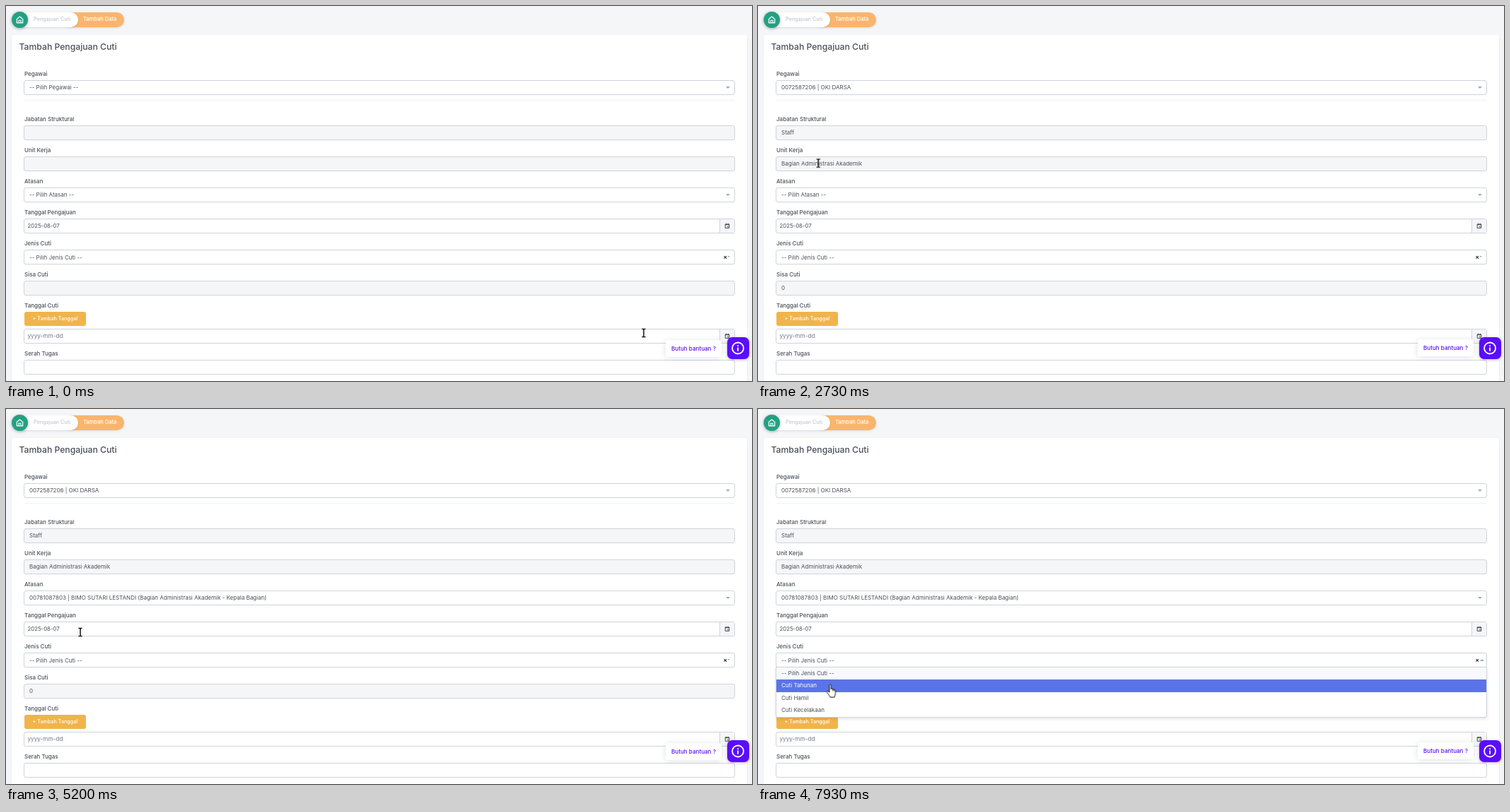
Write an HTML page that moves like this. It is 1054x531 px and loops after 8000 ms.

```html
<!DOCTYPE html>
<html lang="id">
<head>
<meta charset="utf-8">
<title>Tambah Pengajuan Cuti</title>
<style>
  html, body { margin: 0; width: 100%; height: 100%; overflow: hidden; background: #f5f6f8; }
  #stage { position: absolute; left: 0; top: 0; width: 1054px; height: 531px; overflow: hidden;
    font: 400 8px/20px Inter, "Open Sans", sans-serif; color: #495057; white-space: nowrap; }
  #stage div, #stage span, #stage svg { position: absolute; box-sizing: border-box; }
  svg { overflow: visible; }

  .card { left: 8px; top: 41px; width: 1039px; height: 500px; background: #fff; border-radius: 3px; box-shadow: 0 1px 3px rgba(15,34,58,.06); }
  .pill { top: 9px; height: 20.5px; line-height: 20px; border-radius: 11px; font-size: 7.2px; font-weight: 500; box-shadow: 0 1px 3px rgba(15,34,58,.12); }
  .home { left: 8px; top: 8px; width: 23px; height: 23px; border-radius: 50%; background: #23a183; box-shadow: 0 1px 4px rgba(15,34,58,.35); }
  h1 { position: absolute; left: 18.5px; top: 48px; margin: 0; font: 500 12.2px/20px Inter, "Open Sans", sans-serif; }
  .label { left: 26px; font-weight: 500; }
  .field { left: 25px; width: 1005px; height: 21px; line-height: 19px; background: #fff; border: 1px solid #ced4da; border-radius: 3px; }
  .field span { left: 7px; }
  .off { background: #f5f6f8; }
  .date span { left: 4.5px; }
  .cal { right: 0; top: 0; width: 21px; height: 19px; background: #f5f6f8; border-left: 1px solid #ced4da; }
  .caret { right: 6px; top: 8px; border: 3px solid transparent; border-top: 3.5px solid #a4a9af; border-bottom: 0; }
  .up { right: 4px; top: -15px; width: 10px; height: 9px; background: #fff; }
  .up::after { content: ""; position: absolute; left: 2px; top: 3px; border: 3px solid transparent; border-bottom: 3.5px solid #a4a9af; border-top: 0; }
  .field .clear { left: 987.5px; font-size: 8px; font-weight: 800; color: #343a40; }
  .small { right: 6px; border-width: 2.4px 2.4px 0; }
  .button { left: 25.6px; top: 433px; width: 87.6px; height: 19.6px; border-radius: 3px; background: #f1b44c; color: #fff;
    font-size: 7.2px; font-weight: 500; text-align: center; }

  .list { left: 25px; width: 1005px; background: #fff; border: 1px solid #ced4da; border-radius: 0 0 3px 3px; box-shadow: 0 2px 4px rgba(15,34,58,.12); }
  .search { left: 6px; top: 5px; width: 992px; height: 17px; border: 1px solid #c6cace; }
  .search::after { content: ""; position: absolute; left: 2px; top: 2.5px; width: 1px; height: 10px; background: #6c7278; }
  .row { left: 0; width: 1003px; height: 18px; line-height: 17.5px; padding-left: 7px; }
  .picked { background: #f8f9fa; }

  .picker { left: 25px; top: 143px; width: 133px; height: 153px; padding: 6px; background: #fff; border: 1px solid #e3e6ea;
    border-radius: 3px; box-shadow: 0 2px 8px rgba(15,34,58,.12); font-size: 7.5px; }
  .picker span { width: 17px; height: 17px; line-height: 17px; text-align: center; border-radius: 2px; }
  .picker .head { font-weight: 500; }
  .picker .pale { color: #adb5bd; }
  .picker .now { background: #5b73e8; color: #fff; }

  .help { left: 932px; top: 471.7px; width: 79px; height: 24.5px; line-height: 24px; padding-left: 8px; background: #fff; border-radius: 3px;
    box-shadow: 0 1px 9px rgba(15,34,58,.13); color: #5a10f2; font-size: 8.1px; font-weight: 500; }
  .info { left: 1019px; top: 469px; width: 31px; height: 31px; border-radius: 7px; background: #5b0dfb; box-shadow: 0 1px 4px rgba(40,10,110,.3); }

  /* One shared 8 s timeline; 1% is 80 ms */
  .t { animation: 8s step-end infinite; }
  @keyframes list1 { 0%, 20% { visibility: hidden } 10% { visibility: visible } }
  @keyframes list2 { 0%, 57.5% { visibility: hidden } 42.6% { visibility: visible } }
  @keyframes list3 { 0% { visibility: hidden } 92.5%, 100% { visibility: visible } }
  @keyframes picker { 0%, 83.4% { visibility: hidden } 68.4% { visibility: visible } }
  @keyframes name-before { 0% { visibility: visible } 20%, 100% { visibility: hidden } }
  @keyframes name-after { 0% { visibility: hidden } 20%, 100% { visibility: visible } }
  @keyframes chief-before { 0% { visibility: visible } 57.5%, 100% { visibility: hidden } }
  @keyframes chief-after { 0% { visibility: hidden } 57.5%, 100% { visibility: visible } }
  @keyframes post { 0% { visibility: hidden } 22.9%, 100% { visibility: visible } }
  @keyframes left { 0% { visibility: hidden } 25.9%, 100% { visibility: visible } }
  @keyframes cool1 { 0% { background: #5b73e8; color: #fff } 17.5%, 100% { background: #f8f9fa; color: #495057 } }
  @keyframes warm1 { 0% { background: #fff; color: #495057 } 17.5%, 100% { background: #5b73e8; color: #fff } }
  @keyframes warm2 { 0% { background: #fff; color: #495057 } 49.5%, 100% { background: #5b73e8; color: #fff } }
  @keyframes cool3 { 0% { background: #5b73e8; color: #fff } 98.4%, 100% { background: #f8f9fa; color: #495057 } }
  @keyframes warm3 { 0% { background: #fff; color: #495057 } 98.4%, 100% { background: #5b73e8; color: #fff } }

  @keyframes beam { 0%, 20.8%, 58.3% { visibility: visible } 2.5%, 36%, 80%, 100% { visibility: hidden } }
  @keyframes hand { 0%, 20.8%, 58.3% { visibility: hidden } 8%, 39%, 88%, 100% { visibility: visible } }
  @keyframes arrow { 0%, 8%, 39%, 88%, 100% { visibility: hidden } 2.5%, 36%, 80% { visibility: visible } }
  #cursor { left: 0; top: 0; animation: move 8s linear infinite; }
  @keyframes move {
    0%, .8% { transform: translate(901px, 463px) }
    2.5% { transform: translate(850px, 432px) }
    7.5% { transform: translate(170px, 140px) }
    9.1% { transform: translate(116px, 116px) }
    11.6% { transform: translate(114px, 117px) }
    15.8% { transform: translate(118.5px, 169px) }
    19.1% { transform: translate(112px, 178px) }
    20.8% { transform: translate(108px, 176px) }
    23.3% { transform: translate(102.5px, 173px) }
    27.5% { transform: translate(100px, 178px) }
    32.5% { transform: translate(88px, 212px) }
    38.4% { transform: translate(78px, 250px) }
    41.6%, 43.6% { transform: translate(76px, 267px) }
    47.5% { transform: translate(84px, 312px) }
    51.6%, 57.5% { transform: translate(96px, 329px) }
    62.5% { transform: translate(104px, 317px) }
    65%, 75% { transform: translate(105px, 316px) }
    77.5% { transform: translate(104px, 312px) }
    83.4%, 85.2% { transform: translate(93.3px, 297px) }
    86.6% { transform: translate(92px, 338px) }
    89.1% { transform: translate(91px, 353px) }
    94.1% { transform: translate(92px, 355px) }
    97.5% { transform: translate(97px, 372px) }
    99.1%, 100% { transform: translate(101.5px, 389px) }
  }
</style>
</head>
<body>
<div id="stage">
  <div class="pill" style="left:80px;width:86.5px;padding-left:29px;background:#fab56c;color:#fff;font-size:7.5px">Tambah Data</div>
  <div class="pill" style="left:12px;width:89.5px;padding-left:27px;background:#fff;color:#c2c5ca">Pengajuan Cuti</div>
  <div class="home"><svg width="23" height="23" fill="none" stroke="#fff" stroke-width="1.2" stroke-linejoin="round"><path d="M7.3 10.5 11.5 7l4.2 3.5v5.3H7.3zM10 15.6v-3.2h3v3.2"/></svg></div>

  <div class="card"></div>
  <h1>Tambah Pengajuan Cuti</h1>

  <div class="label" style="top:86px">Pegawai</div>
  <div class="field" style="top:105px">
    <span class="t" style="animation-name:name-before">-- Pilih Pegawai --</span>
    <span class="t" style="animation-name:name-after">0072587206 | OKI DARSA</span>
    <div class="caret"></div>
  </div>
  <div style="left:26px;top:133px;width:1003px;height:1px;background:#f0f1f3"></div>

  <div class="label" style="top:150px">Jabatan Struktural</div>
  <div class="field off" style="top:169px"><span class="t" style="animation-name:post">Staff</span></div>

  <div class="label" style="top:193.5px">Unit Kerja</div>
  <div class="field off" style="top:213px"><span class="t" style="animation-name:post">Bagian Administrasi Akademik</span></div>

  <div class="label" style="top:238px">Atasan</div>
  <div class="field" style="top:257px">
    <span class="t" style="animation-name:chief-before">-- Pilih Atasan --</span>
    <span class="t" style="animation-name:chief-after">00781087803 | BIMO SUTARI LESTANDI (Bagian Administrasi Akademik - Kepala Bagian)</span>
    <div class="caret"></div>
  </div>

  <div class="label" style="top:281.5px">Tanggal Pengajuan</div>
  <div class="field date" style="top:301px"><span style="font-size:7.8px">2025-08-07</span><div class="cal"></div></div>

  <div class="label" style="top:326px">Jenis Cuti</div>
  <div class="field" style="top:345px"><span style="top:.5px">-- Pilih Jenis Cuti --</span><span class="clear">×</span><div class="caret small"></div></div>

  <div class="label" style="top:369.5px">Sisa Cuti</div>
  <div class="field off" style="top:389px"><span class="t" style="animation-name:left">0</span></div>

  <div class="label" style="top:414px">Tanggal Cuti</div>
  <div class="button">+ Tambah Tanggal</div>
  <div class="field date" style="top:457px"><span style="color:#74788d;font-size:8.2px">yyyy-mm-dd</span><div class="cal"></div></div>

  <div class="label" style="top:482px">Serah Tugas</div>
  <div class="field" style="top:501px"></div>

  <div class="list t" style="top:125px;height:63px;animation-name:list1">
    <div class="up"></div><div class="search"></div>
    <div class="row t" style="top:26px;animation-name:cool1">-- Pilih Pegawai --</div>
    <div class="row t" style="top:44px;height:17px;animation-name:warm1">0072587206 | OKI DARSA</div>
  </div>
  <div class="list t" style="top:277px;height:63px;animation-name:list2">
    <div class="up"></div><div class="search"></div>
    <div class="row picked" style="top:26px">-- Pilih Atasan --</div>
    <div class="row t" style="top:44px;height:17px;animation-name:warm2">00781087803 | BIMO SUTARI LESTANDI (Bagian Administrasi Akademik - Kepala Bagian)</div>
  </div>
  <div class="list t" style="top:365px;height:72px;animation-name:list3">
    <div class="up" style="width:7px"></div>
    <div class="row t" style="top:0;height:17px;animation-name:cool3">-- Pilih Jenis Cuti --</div>
    <div class="row t" style="top:17px;animation-name:warm3">Cuti Tahunan</div>
    <div class="row" style="top:35px">Cuti Hamil</div>
    <div class="row" style="top:52px">Cuti Kecelakaan</div>
  </div>
  <div class="picker t" id="picker" style="animation-name:picker"></div>

  <div class="help" id="help">Butuh bantuan ?</div>
  <div class="info"><svg width="31" height="31" fill="none" stroke="#fff" stroke-width="1.8"><circle cx="15.1" cy="15.5" r="8"/><path d="M15.1 14.6v5.2M15.1 11.2v1.9"/></svg></div>

  <div id="cursor">
    <svg class="t" style="animation-name:beam" width="1" height="1" fill="none" stroke="#000" stroke-width="1.4"><path d="M-2.6-5.6h1.8L0-5 .8-5.6h1.8M0-5V5M-2.6 5.6h1.8L0 5l.8.6h1.8"/></svg>
    <svg class="t" style="animation-name:hand" width="1" height="1" fill="#fff" stroke="#111" stroke-width="1" stroke-linejoin="round"><path transform="translate(-4.6 .6)" d="M4 1.4c0-1.2 2.4-1.2 2.4 0V7c.3-.8 2-.7 2.2.3.5-.7 1.9-.5 2 .6.6-.6 1.9-.3 1.9.9V13c0 2-1.2 2.6-1.2 5.5H5C4.6 16 1.5 13.8.6 11.2 .1 9.8 1.6 9 2.5 10L4 11.6zM8.6 7.3v2.4M10.6 7.9v2"/></svg>
    <svg class="t" style="animation-name:arrow" width="1" height="1" fill="#fff" stroke="#111" stroke-width="1" stroke-linejoin="round"><path d="M0 0v12.2l2.8-2.5 2 4.7 2-.9-2-4.5h3.7z"/></svg>
  </div>
</div>
<script>
  // Small calendar glyph in each date button
  for (const el of document.querySelectorAll('.cal'))
    el.innerHTML = '<svg width="20" height="19" fill="none" stroke="#343a40" stroke-width=".9"><path d="M7.2 7h5.6v5.4H7.2zM7.2 7.7h5.6M8.6 5.9v1M11.4 5.9v1"/><path d="M10.2 9.8h1.4v1.4h-1.4z" fill="#343a40" stroke="none"/></svg>';

  const picker = document.getElementById('picker');
  function cell(text, col, row, kind, width = 17) {
    const el = document.createElement('span');
    el.textContent = text;
    el.className = kind;
    el.style.cssText = `left:${6 + col * 17}px;top:${5 + row * 17.5}px;width:${width}px`;
    picker.append(el);
  }
  cell('«', 0, 0, 'head');
  cell('August 2025', 1, 0, 'head', 85);
  cell('»', 6, 0, 'head');
  ['Su', 'Mo', 'Tu', 'We', 'Th', 'Fr', 'Sa'].forEach((d, i) => cell(d, i, 1, 'head'));
  for (let i = 0; i < 42; i++) {
    const day = new Date(2025, 6, 27 + i);
    const kind = day.getMonth() !== 7 ? 'pale' : day.getDate() === 7 ? 'now' : '';
    cell(day.getDate(), i % 7, 2 + Math.floor(i / 7), kind);
  }

  // The help bubble bobs with a period that does not divide the loop
  const help = document.getElementById('help');
  let start;
  function bob(now) {
    start ??= now;
    const t = (now - start) % 8000;
    help.style.transform = `translateY(${1.3 * Math.cos(2 * Math.PI * t / 520)}px)`;
    requestAnimationFrame(bob);
  }
  requestAnimationFrame(bob);
</script>
</body>
</html>
```
